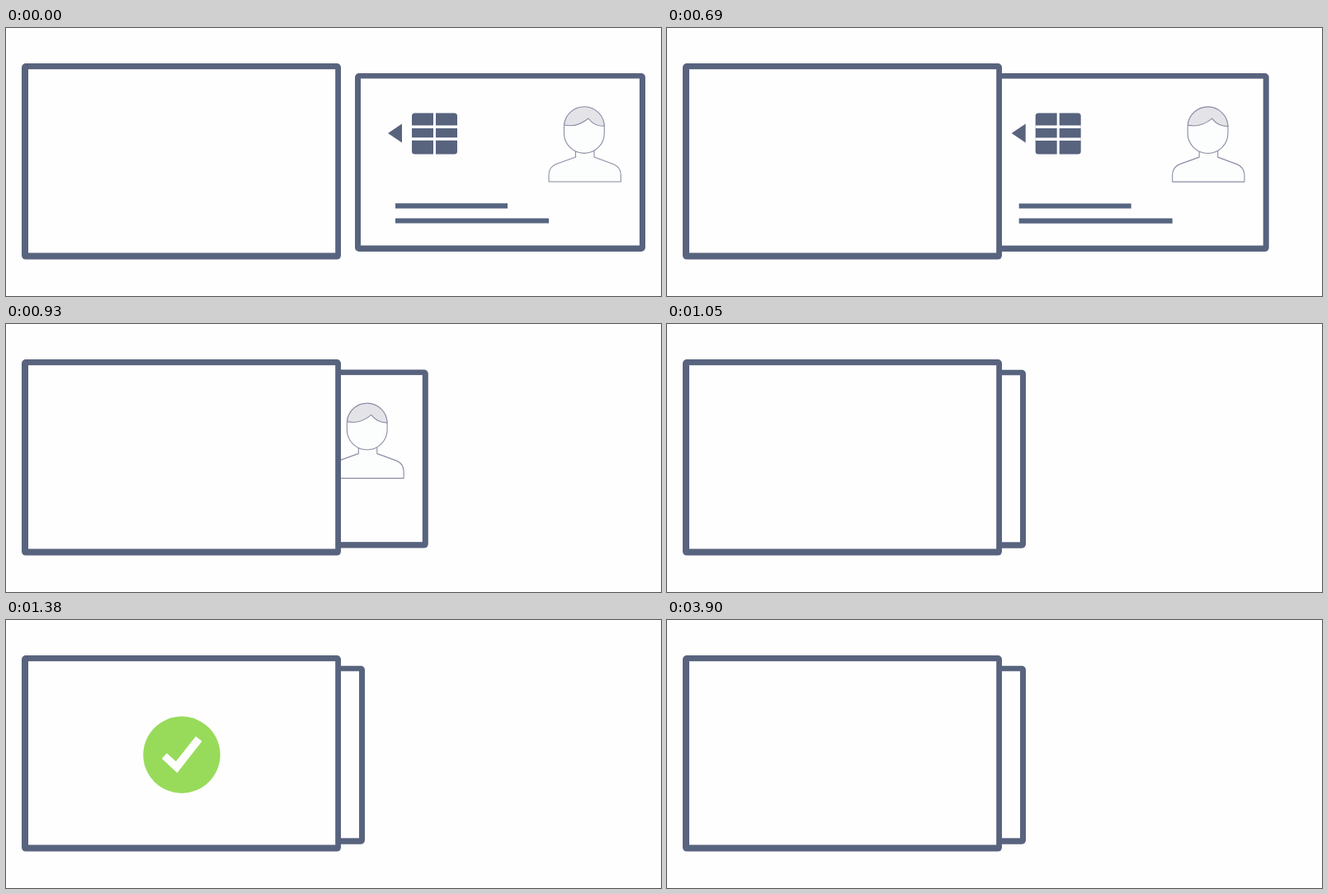
Write an HTML page that moves like this. It is 794 px wide and 326 px high and loops after 4.5 s.

```html
<!DOCTYPE html>
<html lang="en">
<head>
<meta charset="utf-8">
<title>Card insert</title>
<style>
  html, body { margin: 0; width: 100%; height: 100%; overflow: hidden; background: #fefefe; }
  svg { display: block; width: 100vw; height: 100vh; }
  .ink { fill: #58637e; }
  .paper { fill: #fefefe; }
  .person { fill: #fbfefd; stroke: #8c8ca4; stroke-width: 1.1; stroke-linejoin: round; }
</style>
</head>
<body>
<svg viewBox="0 0 794 326">
  <g id="card">
    <rect class="ink" x="423" y="55" width="352" height="217" rx="5"/>
    <rect class="paper" x="430" y="61.5" width="338" height="203"/>
    <path class="ink" d="M463 128L480 116.5V139.5Z"/>
    <rect class="ink" x="492" y="103.5" width="55" height="50" rx="3.5"/>
    <path class="paper" d="M518 103h3v51h-3zM492 118.5h55v3.5h-55zM492 133.3h55v3.5h-55z"/>
    <path fill="#566580" d="M472 213.3h136v6.2h-136zM472 231.4h186v6.2h-186z"/>
    <path class="person" d="M690.5 146V157L667 165.5Q658 169 658 179V187H745.3V179Q745.3 169 736 165.5L713 157V146Z"/>
    <path class="person" d="M676.5 121A24.4 24.4 0 0 1 725.3 121V128A24.4 24.4 0 0 1 676.5 128Z"/>
    <path class="person" style="fill:#e4e4e8" d="M676.6 118A24.4 24.4 0 0 1 725.3 119.5Q713 119.5 706 110Q692 121.5 676.6 118Z"/>
  </g>
  <rect class="ink" x="19" y="43" width="387" height="238.6" rx="5"/>
  <rect class="paper" x="27" y="50.2" width="372.2" height="223.3"/>
  <g id="badge">
    <circle r="46.5" fill="#72ce1d"/>
    <path class="paper" d="M-24 4.5L-18 -2L-7 8L17 -22.5L24.5 -16.5L-5.5 22Z"/>
  </g>
</svg>
<script>
  const LOOP = 4500, STEP = 30;
  const card = document.getElementById('card');
  const badge = document.getElementById('badge');

  const span = (t, from, to) => Math.min(1, Math.max(0, (t - from) / (to - from)));
  // Halfway between linear and smoothstep
  const soft = p => (p + p * p * (3 - 2 * p)) / 2;

  function draw(time) {
    const t = Math.floor((time % LOOP) / STEP) * STEP;

    const nudge = 7.5 * span(t, 180, 450) ** 3;
    const slide = soft(span(t, 600, 1050));
    card.setAttribute('transform', `translate(${nudge - 347.5 * slide} ${0.8 * slide})`);

    const p = span(t, 1200, 1500);
    const scale = 1 + 0.82 * (1 - p) ** 6;
    badge.setAttribute('transform', `translate(213 164) scale(${scale})`);
    badge.setAttribute('opacity', t < 3900 ? p * (1.5 - p / 2) : 0);
  }

  const start = performance.now();
  function tick() {
    draw(performance.now() - start);
    requestAnimationFrame(tick);
  }
  tick();
</script>
</body>
</html>
```
